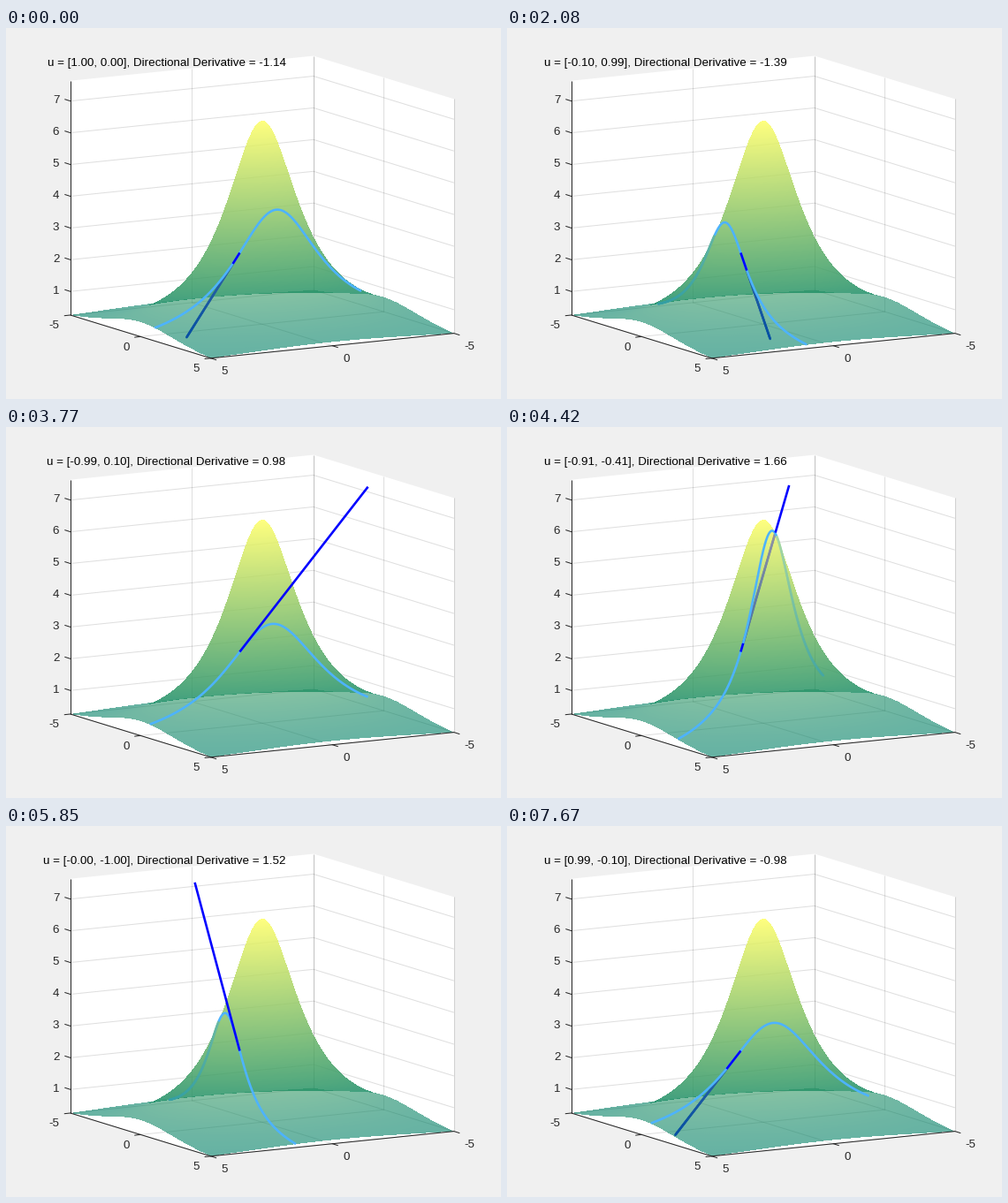
Recreate the animation shown at these times as a matplotlib script. Size 560 by 420 pixels, loop 7.8 s.

```python
import numpy as np
import matplotlib.pyplot as plt
from matplotlib.animation import FuncAnimation
from matplotlib.collections import LineCollection

W, H, DPI = 560, 420, 100
FRAMES, INTERVAL = 60, 130
PX = 72 / DPI                      # points per pixel
FONT = dict(family="Liberation Sans", size=13.33 * PX)
INK = (0.15, 0.15, 0.15)
BLUE = np.array([0, 0, 1.0])
SKY = np.array([0.30, 0.70, 1.0])
ALPHA = 0.6
LIM = 5
ZMIN, ZMAX, PEAK = 20 / 78, 7.64, 20 / 3
P = np.array([1.5, 1.0])

# Orthographic view, azimuth 150, elevation 12, stretched to the plot box
AZ, EL = np.radians(150), np.radians(12)
RIGHT = np.array([np.cos(AZ), np.sin(AZ)])
NEAR = np.array([np.sin(AZ), -np.cos(AZ)])
LEFT, TOP, BOX_W, BOX_H = 72.8, 31.5, 434.0, 342.3
SPAN = 2 * LIM * (abs(np.cos(AZ)) + abs(np.sin(AZ)))
RISE = BOX_H / (1 + SPAN / (2 * LIM) * np.tan(EL))
SX, SW, SZ = BOX_W / SPAN, (BOX_H - RISE) / SPAN, RISE / (ZMAX - ZMIN)
CX, CY = LEFT + BOX_W / 2, TOP + RISE + (BOX_H - RISE) / 2


def f(x, y):
    return 20 / (3 + x**2 + 2 * y**2)


def row(w, z):
    return CY + SW * w - SZ * (z - ZMIN)


def across(x, y):
    return x * RIGHT[0] + y * RIGHT[1]


def toward(x, y):
    return x * NEAR[0] + y * NEAR[1]


def project(x, y, z):
    return CX + SX * across(x, y), row(toward(x, y), z)


def summer(z):
    t = np.clip((z - ZMIN) / (PEAK - ZMIN), 0, 1)
    return np.stack([t, 0.5 + t / 2, np.full_like(t, 0.4)], axis=-1)


def depth_range(h):
    """Far and near depth of the square domain along each sight line."""
    ends = [np.sort([(s * LIM - h * r) / n for s in (-1, 1)], axis=0)
            for r, n in zip(RIGHT, NEAR)]
    return (np.maximum(ends[0][0], ends[1][0]),
            np.minimum(ends[0][1], ends[1][1]))


def veil(h, w0, sy, steps):
    """Blend the surface layers lying between depth w0 and the viewer."""
    shape = np.broadcast(h, sy).shape
    color, clear = np.zeros(shape + (3,)), np.ones(shape)
    end = np.maximum(depth_range(h)[1], w0)
    start = np.minimum(w0 + 0.006, end)
    rows = np.broadcast_to(sy, shape)
    side = None
    for s in np.linspace(0, 1, steps):
        w = start + (end - start) * s
        z = f(h * RIGHT[0] + w * NEAR[0], h * RIGHT[1] + w * NEAR[1])
        below = row(w, z) > sy
        if side is not None:
            hit = below != side
            if hit.any():
                w_hit = np.broadcast_to(w, shape)[hit]
                z_hit = (CY + SW * w_hit - rows[hit]) / SZ + ZMIN
                color[hit] = (1 - ALPHA) * color[hit] + ALPHA * summer(z_hit)
                clear[hit] *= 1 - ALPHA
        side = below
    return color, clear


fig = plt.figure(figsize=(W / DPI, H / DPI), dpi=DPI, facecolor="#f0f0f0")
ax = fig.add_axes([0, 0, 1, 1])
ax.set_xlim(0, W)
ax.set_ylim(H, 0)
ax.axis("off")


def stroke(a, b, **style):
    xs, ys = zip(project(*a), project(*b))
    ax.plot(xs, ys, lw=PX, solid_capstyle="butt", **style)


def label(x, y, text, ha):
    ax.text(x, y + 4.8, text, ha=ha, va="baseline", color=INK, **FONT)


def tick(x, y, dx, dy):
    ax.plot([x, x + dx], [y, y + dy], color=INK, lw=PX, zorder=3)


def draw_box():
    lo, hi = -LIM, LIM
    panels = [
        [(lo, lo, ZMIN), (hi, lo, ZMIN), (hi, lo, ZMAX), (lo, lo, ZMAX)],
        [(lo, lo, ZMIN), (lo, hi, ZMIN), (lo, hi, ZMAX), (lo, lo, ZMAX)],
        [(lo, lo, ZMIN), (hi, lo, ZMIN), (hi, hi, ZMIN), (lo, hi, ZMIN)],
    ]
    for panel in panels:
        ax.fill(*zip(*[project(*c) for c in panel]), color="white", lw=0,
                zorder=0)

    grid = dict(color=INK, alpha=0.15, zorder=1)
    for v in (lo, 0, hi):
        stroke((v, lo, ZMIN), (v, lo, ZMAX), **grid)
        stroke((lo, v, ZMIN), (lo, v, ZMAX), **grid)
        stroke((v, lo, ZMIN), (v, hi, ZMIN), **grid)
        stroke((lo, v, ZMIN), (hi, v, ZMIN), **grid)
    for z in range(1, 8):
        stroke((lo, lo, z), (hi, lo, z), **grid)
        stroke((lo, lo, z), (lo, hi, z), **grid)

    edge = dict(color=INK, zorder=3)
    stroke((hi, lo, ZMIN), (hi, lo, ZMAX), **edge)
    stroke((hi, lo, ZMIN), (hi, hi, ZMIN), **edge)
    stroke((lo, hi, ZMIN), (hi, hi, ZMIN), **edge)

    for v in (lo, 0, hi):
        x, y = project(v, hi, ZMIN)
        tick(x, y, 6, 1.9)
        label(x + 12, y + 13.5, str(v), "left")
        x, y = project(hi, v, ZMIN)
        tick(x, y, -6.5, 0.7)
        label(x - 12.5, y + 10.7, str(v), "right")
    for z in range(1, 8):
        x, y = project(hi, lo, z)
        tick(x, y, -6, -1.9)
        label(x - 12.5, y - 2, str(z), "right")


def draw_surface():
    h = ((np.arange(W) + 0.5 - CX) / SX)[None, :]
    sy = (np.arange(H) + 0.5)[:, None]
    color, clear = veil(h, depth_range(h)[0], sy, 420)
    cover = 1 - clear
    rgb = color / np.maximum(cover, 1e-6)[..., None]
    image = np.clip(np.dstack([rgb, cover]), 0, 1)
    ax.imshow(image, extent=(0, W, H, 0), interpolation="nearest",
              aspect="auto", zorder=2)


class Path:
    """A space curve: open parts as a line, covered parts tinted."""

    def __init__(self, color, zorder):
        self.color = color
        width = 2.6 * PX
        self.covered = LineCollection([], linewidths=width, capstyle="round",
                                      zorder=zorder)
        ax.add_collection(self.covered, autolim=False)
        self.open, = ax.plot([], [], color=color, lw=width,
                             solid_capstyle="butt", zorder=zorder + 2)

    def update(self, x, y, z):
        sx, sy = project(x, y, z)
        tint, clear = veil(across(x, y), toward(x, y), sy, 180)
        rgb = tint + clear[:, None] * self.color
        hidden = clear < 1
        self.open.set_data(sx, np.where(hidden, np.nan, sy))
        pts = np.column_stack([sx, sy])
        segments = np.stack([pts[:-1], pts[1:]], axis=1)
        behind = hidden[:-1] | hidden[1:]
        shade = np.where(hidden[1:, None], rgb[1:], rgb[:-1])
        self.covered.set_segments(segments[behind])
        self.covered.set_color(np.clip(shade[behind], 0, 1))


draw_box()
draw_surface()
tangent = Path(BLUE, 4.2)
section = Path(SKY, 4.4)
tangent.open.set_zorder(7)
title = ax.text(316.5, 43, "", ha="right", va="baseline", color="black",
                zorder=8, **FONT)

Z0 = f(*P)
GRADIENT = -Z0**2 / 20 * np.array([2 * P[0], 4 * P[1]])


def update(i):
    angle = 2 * np.pi * i / FRAMES
    u = np.array([np.cos(angle), np.sin(angle)])
    slope = GRADIENT @ u

    x, y = P[:, None] + u[:, None] * np.linspace(-5, 5, 361)
    inside = (abs(x) <= LIM) & (abs(y) <= LIM)
    x, y = x[inside], y[inside]
    section.update(x, y, f(x, y))

    t = np.linspace(0, 5, 301)
    z = Z0 + slope * t
    keep = (z >= ZMIN) & (z <= ZMAX)
    x, y = P[:, None] + u[:, None] * t[keep]
    tangent.update(x, y, z[keep])

    title.set_text(f"u = [{u[0]:.2f}, {u[1]:.2f}], "
                   f"Directional Derivative = {slope:.2f}")
    return ()


anim = FuncAnimation(fig, update, frames=FRAMES, interval=INTERVAL,
                     repeat=True, repeat_delay=0, blit=False)
plt.show()
```
